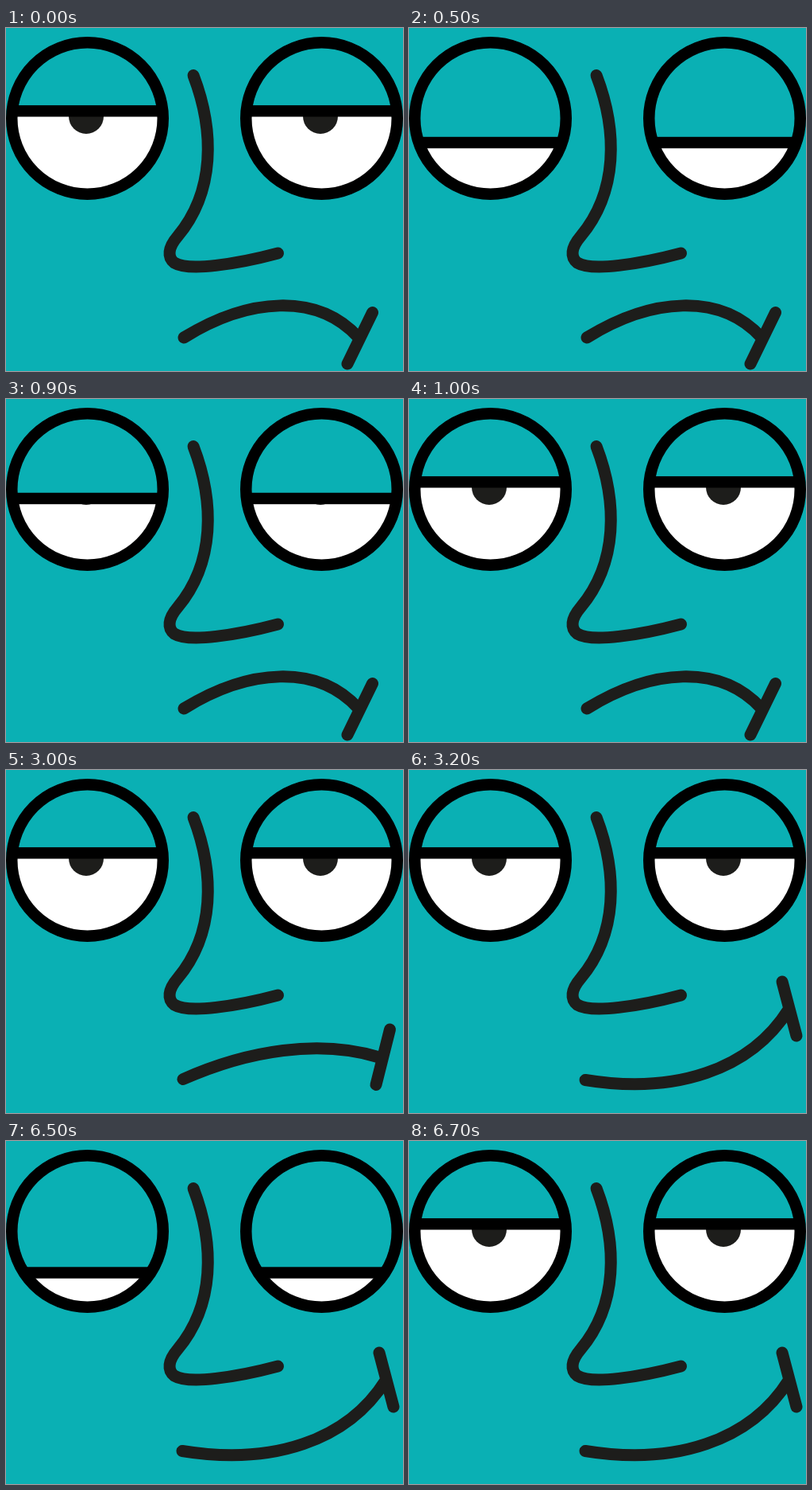
An HTML page that plays this animation: 500 by 431 pixels, repeating every 8 s.

```html
<!DOCTYPE html>
<html lang="en">
<head>
<meta charset="utf-8">
<title>Sleepy face</title>
<style>
  html, body { margin: 0; width: 100%; height: 100%; overflow: hidden; background: #0ab0b4; }
  svg { display: block; width: 100vw; height: 100vh; }
  .ink { fill: none; stroke: #1d1d1b; stroke-width: 15; stroke-linecap: round; stroke-linejoin: round; }
</style>
</head>
<body>
<svg viewBox="0 0 500 431">
  <defs>
    <clipPath id="ball"><circle cx="102.5" cy="113.5" r="95"/></clipPath>
    <g id="eye">
      <g clip-path="url(#ball)">
        <rect width="205" height="220" fill="#fff"/>
        <circle cx="101" cy="111" r="22" fill="#1d1d1b"/>
        <g id="lid">
          <rect y="-220" width="205" height="220" fill="#0ab0b4"/>
          <rect y="-7.2" width="205" height="14.4"/>
        </g>
      </g>
      <circle cx="102.5" cy="113.5" r="95.25" fill="none" stroke="#000" stroke-width="14.5"/>
    </g>
  </defs>
  <rect width="500" height="431" fill="#0ab0b4"/>
  <use href="#eye"/>
  <use href="#eye" x="295"/>
  <path class="ink" d="M236 59.5C263 130 263 206 216 262C204 276 203 288 212 295C230 306 290 297 342.5 283"/>
  <path class="ink" id="mouth"/>
</svg>
<script>
  const LOOP = 8000, STEP = 100, OPEN = 104.3;
  const BLINKS = [500, 6200];
  const BLINK_LIDS = [144, 185, 205, 165.5, 125];

  // Lip curve plus the tick at its corner, by start time
  const MOUTHS = [
    [0, "M224 389C305 339 392 332 444 389M461.5 357.5L430 422"],
    [3000, "M223 388.5C305 352 395 338 470 361M483.5 326L466 395.5"],
    [3100, "M222 389C315 375 415 366 481 334M481 295L482 366"],
    [3200, "M222 389.5C335 408 430 377 478 301M470 266L488 334"]
  ];

  const lid = document.getElementById("lid");
  const mouth = document.getElementById("mouth");

  function lidAt(t) {
    for (const start of BLINKS) {
      const y = BLINK_LIDS[Math.floor((t - start) / STEP)];
      if (y) return y;
    }
    return OPEN;
  }

  const mouthAt = t => MOUTHS.filter(m => m[0] <= t).pop()[1];

  function draw(t) {
    lid.setAttribute("transform", `translate(0 ${lidAt(t)})`);
    mouth.setAttribute("d", mouthAt(t));
  }

  const begin = performance.now();
  function tick() {
    draw((performance.now() - begin) % LOOP);
    requestAnimationFrame(tick);
  }
  tick();
</script>
</body>
</html>
```
